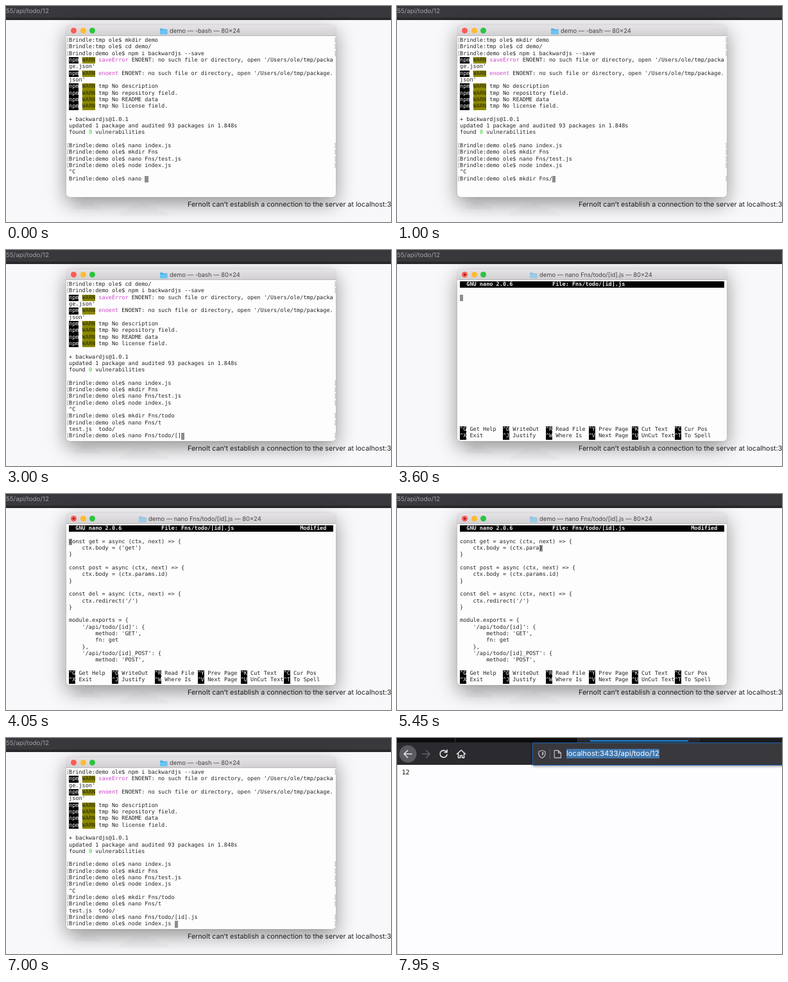
An HTML page for the animation above (8000 ms loop, 600x338 px).

```html
<!DOCTYPE html>
<html lang="en">
<head>
<meta charset="utf-8">
<title>Terminal demo</title>
<style>
html, body { margin: 0; width: 100%; height: 100%; overflow: hidden; }
body { position: relative; background: #f8f8fa; text-rendering: geometricPrecision; font-family: Inter, "Open Sans", sans-serif; }
div, svg { position: absolute; }
.scene { left: 0; top: 0; width: 600px; height: 338px; overflow: hidden; }
.line { white-space: pre; line-height: 16px; }

#strip { left: 0; top: 0; width: 600px; height: 18px; background: #39383d; border-bottom: 4px solid #29292c; }
#path { left: 0; top: 1px; font-size: 9.8px; color: #a2a2a6; }
#error { left: 283px; top: 302.5px; font-size: 10.7px; color: #222225; }

#win { left: 94px; top: 30px; width: 420px; height: 269px; border-radius: 5px; background: #fefdfe;
  box-shadow: 0 0 1px rgba(0,0,0,.4), 0 10px 30px rgba(0,0,0,.42); }
#bar { left: 0; top: 0; width: 420px; height: 16px; border-radius: 5px 5px 0 0;
  background: linear-gradient(#e6e3e6, #d3d0d3); border-bottom: 1px solid #bbb8bb; }
.dot { top: 4px; width: 9px; height: 9px; border-radius: 50%; }
.busy .dot:first-child::after { content: ""; position: absolute; left: 3px; top: 3px; width: 3px; height: 3px; border-radius: 50%; background: #7a1210; }
#title { left: 146px; top: 2px; font-size: 9.4px; color: #464447; padding-left: 15px; }
#title svg { left: 0; top: 2.5px; }
.busy #title { left: 113px; }
.busy #title svg { opacity: .55; }

#term { left: 4px; top: 18.9px; font: 8.555px "DejaVu Sans Mono", monospace; color: #222; }
#term p { position: relative; margin: 0; height: 10.33px; line-height: 10.33px; white-space: pre; }
#term b, #term u, #term i { display: inline-block; vertical-align: top; height: 10.33px; font-style: normal; font-weight: 400; text-decoration: none; }
#term b { background: #000; color: #f0f0f0; }
#term b.head { font-weight: 700; }
#term u { background: #8b8900; color: #2a2800; }
#term i { background: #8d8d8d; }
#term s { color: #c846c8; text-decoration: none; }
#term em { color: #30c830; font-style: normal; }
.mark::before, .mark::after { position: absolute; top: 0; }
.mark::before { content: "["; left: -4.2px; color: #888; }
.mark::after { content: "]"; left: 412.3px; color: #a4a4a4; }

#page { background: #fdfcfe; display: none; }
#field { left: 214px; top: 11px; width: 400px; height: 28px; background: #39383d; border-radius: 2px; }
#url { left: 264px; top: 17px; font-size: 11.4px; line-height: 15px; color: #a7a7ab; }
#url span { color: #f9f9fa; }
.focus #field { left: 211px; top: 7px; height: 34px; border: 1px solid #1b64b4; box-shadow: 0 1px 4px rgba(0,0,0,.45); }
.focus #url { background: #3f76ad; color: #fff; }
#answer { left: 7.5px; top: 47px; font: 10px/16px "DejaVu Sans Mono", monospace; color: #111; }
</style>
</head>
<body>
<div class="scene" id="desk">
  <div id="strip"></div>
  <div id="path" class="line">55/api/todo/12</div>
  <svg width="600" height="338" fill="#f2f2f5">
    <path d="M106 318q1-9 9-8 5-9 13-3 9-2 10 5 9-1 11 6z"/>
    <path d="M176 328q3-9 13-8 5-12 17-8 11-7 18 3 11-3 14 6 12-1 17 7z"/>
  </svg>
  <div id="error" class="line">Fernolt can’t establish a connection to the server at localhost:3</div>
  <div id="win">
    <div id="bar">
      <div class="dot" style="left:6.5px;background:#fc5b54"></div>
      <div class="dot" style="left:21.5px;background:#fdbb2f"></div>
      <div class="dot" style="left:35.5px;background:#2ac440"></div>
      <div id="title" class="line"><svg width="12" height="10"><path d="M0 1.2q0-.9.9-.9h3.3l1.2 1.2h5q1 0 1 1v6q0 .8-.8.8H.8q-.8 0-.8-.8z" fill="#4fb0e6"/><path d="M0 3h11.4v5.5q0 .8-.8.8H.8q-.8 0-.8-.8z" fill="#6cc4f3"/></svg><span id="name"></span></div>
    </div>
    <div id="term"></div>
  </div>
</div>

<div class="scene" id="page">
  <svg width="600" height="338">
    <path d="M0 0H600V42H0z" fill="#2b2a2e"/>
    <path d="M0 0H600V7H0z" fill="#0d0d0f"/>
    <path d="M282 0H473V7H282z" fill="#29292d"/>
    <path d="M474 0H600V7H474z" fill="#1c1c1f"/>
    <path d="M90.5 0V7M281.5 0V7" stroke="#3b3b3f"/>
    <path d="M301 4.5H454" stroke="#1f92ea" stroke-width="2"/>
    <path d="M.5 42V338" stroke="#c9c8cc"/>
    <circle cx="17" cy="25" r="13.5" fill="#5c5b60"/>
    <g fill="none" stroke="#e6e6e9" stroke-width="1.6" stroke-linecap="round" stroke-linejoin="round">
      <path d="M23 25H11.5M16.5 19.5L11 25l5.5 5.5"/>
      <path d="M39 25H50.5M45.5 19.5L51 25l-5.5 5.5" stroke="#616065"/>
      <path d="M77 21.5A5.5 5.5 0 1 0 78 26M78 18.5V22.5H74"/>
      <path d="M93.5 25L100 19l6.5 6M95.5 24.5V31H98.5V27.5H101.5V31H104.5V24.5"/>
    </g>
  </svg>
  <div id="field"></div>
  <svg width="600" height="48" fill="none" stroke="#b9b9bd" stroke-width="1.3" stroke-linejoin="round">
    <path d="M226 19.5l5 1.5v3q0 5-5 7.5q-5-2.5-5-7.5v-3z"/>
    <path d="M226 22v6q2.5-1.5 2.5-4.5v-1z" fill="#b9b9bd" stroke="none"/>
    <path d="M238.5 17V33" stroke="#5c5b60" stroke-width="1"/>
    <path d="M246 19.5h5.5l4 4v7.5h-9.5q-.8 0-.8-.8v-10q0-.7.8-.7zM251.500 19.5v4h4"/>
  </svg>
  <div id="url" class="line"><span>localhost</span>:3433/api/todo/12</div>
  <div id="answer">12</div>
</div>

<script>
const LOOP = 8000, ROWS = 24, CUT = 7100, FOCUS = 7950;
const $ = id => document.getElementById(id);
const snaps = [];

const prompt = dir => `Brindle:${dir} ole$ `;
const row = (text, mark) => `<p${mark ? ' class="mark"' : ''}>${text}</p>`;
const cmd = (text, dir = 'demo') => row(prompt(dir) + text, true);
const warn = text => row('<b>npm</b> <u>WARN</u> ' + text);
const enoent = 'ENOENT: no such file or directory, open ';
const cursor = (text, col) =>
  `${text.slice(0, col)}<i>${text[col] || ' '}</i>${text.slice(col + 1)}`;

// Shell
const log = [
  cmd('mkdir demo', 'tmp'),
  cmd('cd demo/', 'tmp'),
  cmd('npm i backwardjs --save'),
  warn(`<s>saveError</s> ${enoent}'/Users/ole/tmp/packa`),
  row("ge.json'"),
  warn(`<s>enoent</s> ${enoent}'/Users/ole/tmp/package.`),
  row("json'"),
  ...['description', 'repository field.', 'README data', 'license field.'].map(s => warn('tmp No ' + s)),
  row(''),
  row('+ backwardjs@1.0.1'),
  row('updated 1 package and audited 93 packages in 1.848s'),
  row('found <em>0</em> vulnerabilities'),
  row(''),
  cmd('nano index.js'),
  cmd('mkdir Fns'),
  cmd('nano Fns/test.js'),
  cmd('node index.js'),
  row('^C')
];

function shell(t, live, back = 0, mark = live !== '') {
  const text = prompt('demo') + live;
  const rows = [...log, row(cursor(text, text.length - back), mark)];
  snaps.push({ t, name: 'demo — -bash — 80×24', busy: false, html: rows.slice(-ROWS).join('') });
}

function type(t0, t1, text) {
  for (let k = 1; k <= text.length; k++)
    shell(t0 + (t1 - t0) * (k - 1) / (text.length - 1), text.slice(0, k));
}

// Editor
const keys = list => row(list.map(s => `<b>${s.slice(0, 2)}</b>${s.slice(2).padEnd(11)}`).join(''));
const help = keys(['^G Get Help', '^O WriteOut', '^R Read File', '^Y Prev Page', '^K Cut Text', '^C Cur Pos'])
  + keys(['^X Exit', '^J Justify', '^W Where Is', '^V Next Page', '^U UnCut Text', '^T To Spell']);
const source = arg => `
const get = async (ctx, next) => {
    ctx.body = (${arg})
}

const post = async (ctx, next) => {
    ctx.body = (ctx.params.id)
}

const del = async (ctx, next) => {
    ctx.redirect('/')
}

module.exports = {
    '/api/todo/[id]': {
        method: 'GET',
        fn: get
    },
    '/api/todo/[id]_POST': {
        method: 'POST',
`.split('\n');

function nano(t, lines, line, col) {
  const head = ('  GNU nano 2.0.6'.padEnd(28) + 'File: Fns/todo/[id].js').padEnd(70)
    + (lines.length ? 'Modified' : '').padEnd(10);
  const body = Array.from({ length: 21 }, (_, k) => {
    const text = lines[k] || '';
    return row(k === line ? cursor(text, col) : text);
  });
  snaps.push({ t, name: 'demo — nano Fns/todo/[id].js — 80×24', busy: true,
    html: row(`<b class="head">${head}</b>`) + body.join('') + help });
}
const edit = (t, arg) => nano(t, source(arg), 2, 16 + arg.length);

// Timeline
shell(0, 'nano ', 0, false);
for (let k = 1; k <= 5; k++) shell(k * 50, 'nano '.slice(0, 5 - k));
type(300, 1240, 'mkdir Fns/todo');
log.push(cmd('mkdir Fns/todo'));
shell(1300, '');
type(1700, 2230, 'nano Fns/t');
log.push(cmd('nano Fns/t'), row('test.js  todo/'));
shell(2400, 'nano Fns/t');
shell(2550, 'nano Fns/to');
shell(2700, 'nano Fns/todo/');
shell(2850, 'nano Fns/todo/[');
shell(2950, 'nano Fns/todo/[]');
shell(3100, 'nano Fns/todo/[]', 1);
shell(3150, 'nano Fns/todo/[i]', 1);
shell(3200, 'nano Fns/todo/[id]', 1);
shell(3250, 'nano Fns/todo/[id]');
shell(3300, 'nano Fns/todo/[id].');
shell(3350, 'nano Fns/todo/[id].j');
shell(3400, 'nano Fns/todo/[id].js');
log.push(cmd('nano Fns/todo/[id].js'));

nano(3500, [], 1, 0);
const first = "'get'", next = 'ctx.params.id';
nano(3700, source(first), 1, 0);
nano(4550, source(first), 2, 0);
nano(4650, source(first), 2, 22);
edit(4800, first);
for (let k = 1; k <= 5; k++) edit(4970 + 30 * k, first.slice(0, 5 - k));
for (let k = 1; k <= next.length; k++) edit(5125 + 40 * k, next.slice(0, k));

shell(6000, '');
type(6200, 6600, 'node ind');
shell(6700, 'node index.js ');

let shown = null;
const start = performance.now();
function draw() {
  const t = Math.max(0, performance.now() - start) % LOOP;
  const snap = snaps.filter(s => s.t <= t).pop();
  if (snap !== shown) {
    shown = snap;
    $('term').innerHTML = snap.html;
    $('name').textContent = snap.name;
    $('win').classList.toggle('busy', snap.busy);
  }
  $('page').style.display = t >= CUT ? 'block' : 'none';
  $('page').classList.toggle('focus', t >= FOCUS);
  requestAnimationFrame(draw);
}
draw();
</script>
</body>
</html>
```
